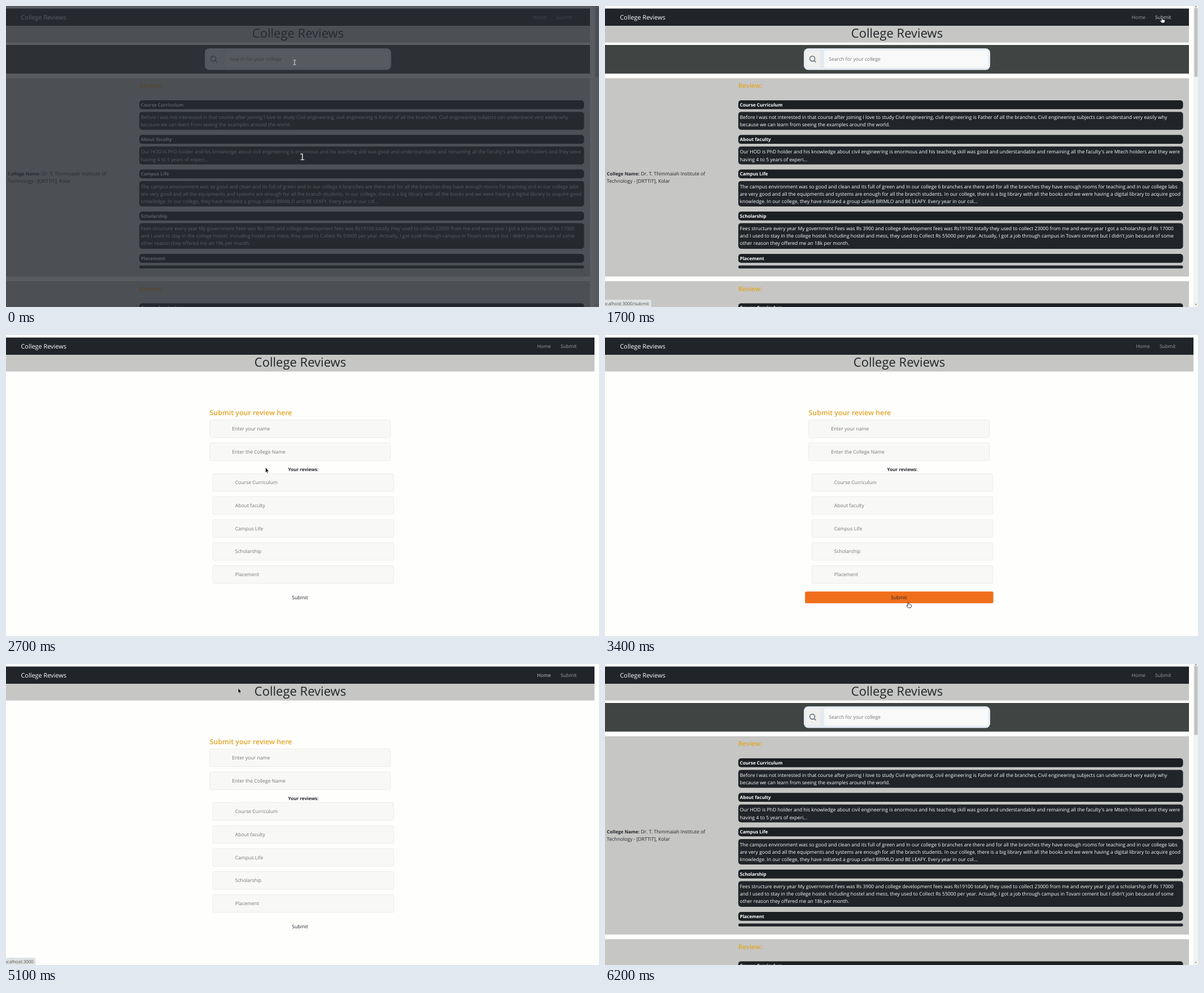
An HTML page for the animation above (6.5 s loop, 1050 by 533 pixels).

```html
<!DOCTYPE html>
<html lang="en">
<head>
<meta charset="utf-8">
<title>College Reviews</title>
<style>
  html, body { margin: 0; width: 100%; height: 100%; overflow: hidden; background: #fefefd; }
  svg { display: block; width: 100vw; height: 100vh; }
  text { font: 8.6px "Open Sans", "Noto Sans", sans-serif; fill: #212529; text-rendering: geometricPrecision; white-space: pre; }
  .bold { font-weight: 700; font-size: 8.1px; }
  .white { fill: #fefefe; }
  .brand { font-size: 10.9px; fill: #fefefe; }
  .title { font-size: 22px; font-weight: 500; }
  .review { font-size: 11.5px; font-weight: 600; fill: #e0a526; }
  .prompt { font-size: 12.4px; font-weight: 600; fill: #e0a526; }
  .hint { fill: #737678; }
  .link { fill: #9b9d9f; }
  .link.lit { fill: #c9cbcc; }
  .mid { text-anchor: middle; }
  .status { font-size: 8px; fill: #4c5052; }
  .count { font: 16px "DejaVu Sans", sans-serif; fill: #dcdddd; }
</style>
</head>
<body>
<svg id="stage" viewBox="0 0 1050 533" preserveAspectRatio="none"></svg>
<script>
const LOOP = 6500, TICK = 100;

const rect = (x, y, right, bottom, fill, radius = 0, extra = '') =>
  `<rect x="${x}" y="${y}" width="${right - x}" height="${bottom - y}" rx="${radius}" fill="${fill}" ${extra}/>`;
const text = (x, y, content, style = '', id = '') =>
  `<text x="${x}" y="${y}" class="${style}" id="${id}">${content}</text>`;

const header = (right, name) =>
  rect(0, 4.5, right, 35.2, '#212529') +
  rect(0, 35.2, right, 64.6, '#c6c6c4') +
  text(26.5, 23.6, 'College Reviews', 'brand') +
  text(right - 101.5, 23, 'Home', 'link', name + 'Home') +
  text(right - 60, 23, 'Submit', 'link', name + 'Submit') +
  text(right / 2, 56.2, 'College Reviews', 'title mid');

// Each section: top of its heading pill, heading, bottom of its body pill, body lines
const sections = [
  [167, 'Course Curriculum', 219.3, [
    'Before I was not interested in that course after joining I love to study Civil engineering, civil engineering is Father of all the branches, Civil engineering subjects can understand very easily why',
    'because we can learn from seeing the examples around the world.']],
  [228.3, 'About faculty', 280.4, [
    "Our HOD is PhD holder and his knowledge about civil engineering is enormous and his teaching skill was good and understandable and remaining all the faculty's are Mtech holders and they were",
    'having 4 to 5 years of experi...']],
  [289.5, 'Campus Life', 355, [
    'The campus environment was so good and clean and its full of green and In our college 6 branches are there and for all the branches they have enough rooms for teaching and in our college labs',
    'are very good and all the equipments and systems are enough for all the branch students. In our college, there is a big library with all the books and we were having a digital library to acquire good',
    'knowledge. In our college, they have initiated a group called BRIMLO and BE LEAFY. Every year in our col...']],
  [364, 'Scholarship', 430, [
    'Fees structure every year My government Fees was Rs 3900 and college development fees was Rs19100 totally they used to collect 23000 from me and every year I got a scholarship of Rs 17000',
    "and I used to stay in the college hostel. Including hostel and mess, they used to Collect Rs 55000 per year. Actually, I got a job through campus in Tovani cement but I didn't join because of some",
    'other reason they offered me an 18k per month.']],
  [439, 'Placement', 464.8, []],
];

const pill = (top, bottom, fill) => rect(236, top, 1023.5, bottom, fill, Math.min(5, (bottom - top) / 2));
const heading = (top, label) => pill(top, top + 15.8, '#1c2023') + text(238.8, top + 10.9, label, 'bold white');
const section = ([top, label, bottom, lines]) =>
  heading(top, label) + pill(top + 20.4, bottom, '#212529') +
  lines.map((line, i) => text(238.8, top + 33 + i * 13.2, line, 'white')).join('');

const homePage = header(1034, 'list') +
  rect(0, 69, 1034, 119.7, '#404442') +
  rect(352, 75, 682, 113.3, '#e4eaf1', 8) +
  rect(355.5, 78.5, 381, 109.8, '#f0f0ef', 4) +
  rect(388, 78.8, 678.5, 109.6, '#f8f9f8', 2) +
  '<path d="M370.4 96.6l3 3.1M371.6 93.2a4.5 4.5 0 1 1-9 0a4.5 4.5 0 1 1 9 0" fill="none" stroke="#54626f" stroke-width="1.4"/>' +
  text(396.3, 97.3, 'Search for your college', 'hint') +
  rect(0, 128, 1034, 479, '#c6c6c4') +
  rect(0, 487.3, 1034, 533, '#c6c6c4') +
  text(3.3, 299.8, '<tspan class="bold">College Name:</tspan> Dr. T. Thimmaiah Institute of') +
  text(3.3, 313, 'Technology - [DRTTIT], Kolar') +
  text(236, 145.3, 'Review:', 'review') +
  text(236, 504.6, 'Review:', 'review') +
  sections.map(section).join('') +
  heading(526.4, 'Course Curriculum') +
  rect(1042, 0, 1050, 533, '#f2f2f1') +
  rect(1043.5, 3.5, 1049.3, 125.5, '#c1c1c0') +
  '<path d="M1044.5 2l1.7-2l1.7 2zM1044.5 527.8l1.7 2l1.7-2z" fill="#777"/>';

const fields = [
  [360.8, 150.3, 'Enter your name'], [360.8, 191, 'Enter the College Name'],
  ...['Course Curriculum', 'About faculty', 'Campus Life', 'Scholarship', 'Placement']
    .map((label, i) => [366.3, 245.2 + i * 40.8, label]),
];
const formPage = header(1042, 'form') +
  text(360.5, 141.5, 'Submit your review here', 'prompt') +
  fields.map(([x, y, label]) =>
    rect(x, y, x + 320, y + 31.4, '#f8f8f7', 2, 'stroke="#e6e6e5" stroke-width=".7"') +
    text(x + 39.5, y + 18.8, label, 'hint')).join('') +
  text(526.5, 241.2, 'Your reviews:', 'bold mid') +
  rect(354.2, 454.3, 687.6, 475, '#f06f1d', 2.5, 'id="button"') +
  text(520.6, 467.7, 'Submit', 'mid');

const outline = 'stroke-linejoin="round" stroke-linecap="round"';
const cursors = {
  arrow: `<path d="M0 0V9.2L2 7.4L3.3 10.5L4.7 9.9L3.4 6.9H6Z" fill="#111" stroke="#fff" stroke-width=".6" ${outline}/>`,
  beam: `<path d="M-2-4.3Q0-4.3 0-3.2Q0-4.3 2-4.3M0-3.2V3.2M-2 4.3Q0 4.3 0 3.2Q0 4.3 2 4.3" fill="none" stroke="currentColor" stroke-width="1" ${outline}/>`,
  hand: `<path d="M-.9 6V.8Q0-.5.9.8V4Q2 3 2.6 4.2Q3.7 3.5 4.2 4.7Q5.6 4.4 5.6 5.7Q5.6 8.4 4.2 10H-.4Q-1.4 8.4-3.3 6.3Q-3.3 4.5-.9 6Z" fill="#fff" stroke="#222" stroke-width=".9" ${outline}/>`,
};

const stage = document.getElementById('stage');
stage.innerHTML =
  rect(0, 0, 1050, 533, '#fefefd') +
  `<g id="home">${homePage}</g><g id="form">${formPage}</g>` +
  `<g id="status">${rect(-4, 520, 0, 536, '#dfe3e4', 2, 'id="statusBar"')}${text(-5, 529.8, '', 'status', 'statusText')}</g>` +
  `<g id="intro">${rect(0, 0, 1050, 533, 'rgba(40,44,50,.77)')}${text(524.5, 272.7, '1', 'count mid')}</g>` +
  '<g id="cursor">' + Object.entries(cursors).map(([kind, shape]) => `<g id="${kind}">${shape}</g>`).join('') + '</g>';

const el = id => document.getElementById(id);
const show = (id, on) => { el(id).style.display = on ? '' : 'none'; };
const light = (id, on) => el(id).classList.toggle('lit', on);

// Pointer route: time, x, y
const route = [
  [0, 511, 100], [500, 511, 100], [1200, 984, 24], [1300, 986, 20], [1700, 986, 20],
  [1900, 670, 182], [2000, 563, 187], [2100, 563, 187], [2300, 457, 187], [2500, 457, 187],
  [2900, 462, 282], [3000, 462, 282], [3200, 505, 522], [3300, 530, 495], [3400, 537, 473],
  [3500, 537, 473], [3700, 540, 465], [3800, 540, 465], [3900, 548, 412], [4000, 548, 412],
  [4300, 973, 38], [4400, 973, 38], [4700, 956, 20], [4900, 956, 20], [5100, 411, 42.5],
  [5500, 165, 3], [5600, 165, 3], [5800, 85, 3],
];

function pointerAt(time) {
  const next = route.findIndex(([at]) => at > time);
  if (next < 0) return route[route.length - 1].slice(1);
  const [t0, x0, y0] = route[next - 1], [t1, x1, y1] = route[next];
  const k = (time - t0) / (t1 - t0);
  return [x0 + (x1 - x0) * k, y0 + (y1 - y0) * k];
}

function draw(now) {
  const time = Math.floor(now % LOOP / TICK) * TICK;
  const onForm = time >= 1900 && time < 6000;
  const onHome = time < 1900 || time >= 6200;
  const [x, y] = pointerAt(time);
  const inside = (left, top, right, bottom) => x >= left && x <= right && y >= top && y <= bottom;

  const overSubmit = onHome && inside(972, 14, 1004, 28);
  const overHome = onForm && inside(938, 12, 968, 28);
  const overButton = onForm && inside(354, 454, 688, 475);
  const overField = onForm
    ? fields.some(([left, top]) => inside(left, top, left + 320, top + 31.4))
    : inside(388, 78, 679, 110);
  const kind = overField ? 'beam' : overSubmit || overHome || overButton ? 'hand' : 'arrow';

  show('home', onHome);
  show('form', onForm);
  show('intro', time < 500);
  show('button', overButton);
  light('listSubmit', overSubmit);
  light('formHome', overHome || time >= 4600 && time < 5200);

  const submitLink = time >= 1300 && time < 2000;
  const homeLink = time >= 4900 && time < 5200;
  show('status', submitLink || homeLink);
  el('status').style.opacity = time === 1900 ? 0.5 : 1;
  el('statusBar').setAttribute('width', submitLink ? 86 : 56.5);
  el('statusText').textContent = 'localhost:3000' + (submitLink ? '/submit' : '');

  show('cursor', time < 5800);
  Object.keys(cursors).forEach(name => show(name, name === kind));
  el('cursor').setAttribute('transform', `translate(${x} ${y})`);
  el('cursor').style.color = time < 500 ? '#e4e4e4' : '#333';
}

let start;
function loop(now) {
  start ??= now;
  draw(now - start);
  requestAnimationFrame(loop);
}
draw(0);
requestAnimationFrame(loop);
</script>
</body>
</html>
```
